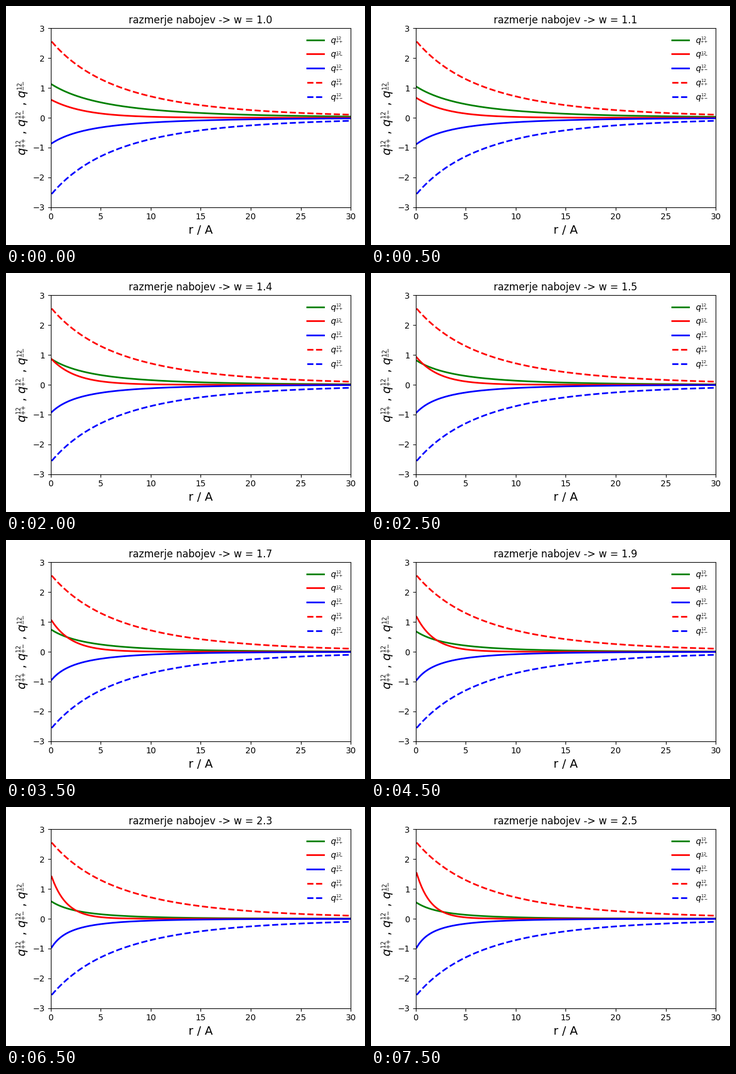
Recreate the animation shown at these times as a matplotlib script. Size 600 by 400 pixels, loop 8 s.

```python
import numpy as np
import matplotlib.pyplot as plt
from matplotlib.animation import FuncAnimation

FRAMES, INTERVAL = 16, 500
R0 = 0.1
r = np.linspace(R0, 30, 300)


def screened(start, kappa, a):
    """Screened Coulomb decay that equals `start` at r = R0."""
    return start * np.exp(-kappa * (r - R0)) * (a + R0) / (a + r)


def q_pp(w):
    return screened(1.12 * w ** -0.8, 0.06 + 0.03 * (w - 1), 7.8 * w ** -0.95)


def q_mm(w):
    return w * (0.672 - 0.06 * w ** -1.6) * np.exp(-0.29 * w * r)


def q_pm(w):
    return -screened(1 - 0.14 * w ** -1.6, 0.06 + 0.033 * (w - 1), 5 * w ** -1.05)


def label(signs):
    # braces around each sign suppress operator spacing
    return r"$q^{_{12}}_{^{{%s}{%s}}}$" % tuple(signs)


reference = 28.56 * np.exp(-0.064 * r) / (r + 11)

fig, ax = plt.subplots(figsize=(6, 4), dpi=100)
curves = [
    (ax.plot(r, f(1.0), color=color, lw=2, label=label(signs))[0], f)
    for f, color, signs in ((q_pp, "green", "++"), (q_mm, "red", "--"), (q_pm, "blue", "+-"))
]
ax.plot(r, reference, "--", color="red", lw=2, label=label("++"))
ax.plot(r, -reference, "--", color="blue", lw=2, label=label("+-"))

ax.set_xlim(0, 30)
ax.set_ylim(-3, 3)
ax.set_xlabel("r / A", fontsize=14)
ax.set_ylabel(" , ".join(map(label, ("++", "+-", "--"))), fontsize=14)
title = ax.set_title("razmerje nabojev -> w = 1.0")
ax.legend(loc="upper right", frameon=False)
fig.tight_layout()


def update(i):
    w = 1 + 0.1 * i
    for line, f in curves:
        line.set_ydata(f(w))
    title.set_text(f"razmerje nabojev -> w = {w:.1f}")
    return [line for line, _ in curves] + [title]


anim = FuncAnimation(fig, update, frames=FRAMES, interval=INTERVAL, repeat=True, repeat_delay=0)
plt.show()
```
